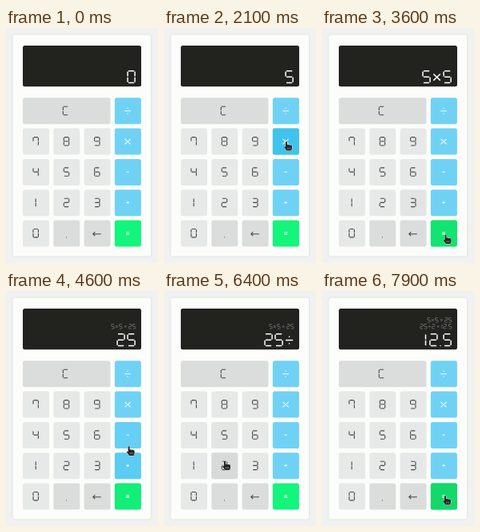
Animation, 190 px wide and 294 px high, one loop 8000 ms. Source, as an HTML page with a canvas:

```html
<!DOCTYPE html>
<html lang="en">
<head>
<meta charset="utf-8">
<title>Calculator</title>
<style>
  html, body { margin: 0; width: 100%; height: 100%; overflow: hidden; background: #f0f2f1; }
  canvas { display: block; width: 190px; height: 294px; }
</style>
</head>
<body>
<canvas role="img" aria-label="Calculator"></canvas>
<script>
const canvas = document.querySelector('canvas');
const ctx = canvas.getContext('2d');
const dpr = window.devicePixelRatio || 1;
canvas.width = 190 * dpr;
canvas.height = 294 * dpr;
ctx.scale(dpr, dpr);

const LOOP = 8000, PITCH = 38.3, SIZE = 33;
const DIGIT = ['#e7e9e8', '#cfd1d0', '#c4c6c5'];
const GRAY = ['#dbdddc', '#cfd1d0', '#c4c6c5'];
const BLUE = ['#6fd2f5', '#40c3ed', '#38bce8'];
const GREEN = ['#13f57b', '#13d86b', '#10cc64'];

const keys = [];
['C  ÷', '789×', '456-', '123+', '0.←='].forEach((row, r) => {
  [...row].forEach((ch, c) => {
    if (ch === ' ') return;
    const colors = ch === '=' ? GREEN : c === 3 ? BLUE : 'C.←'.includes(ch) ? GRAY : DIGIT;
    keys.push({ ch, colors, x: 21 + c * PITCH, y: 87.3 + r * PITCH, w: ch === 'C' ? 109.5 : SIZE });
  });
});

// Fingertip stops: start of move, arrival, x, y
const moves = [
  [600, 700, 153, 258], [800, 1200, 84, 177], [1650, 2050, 153, 142],
  [2350, 2650, 84.5, 177.5], [3350, 3600, 154.5, 258.5], [4400, 4850, 152.5, 106],
  [6000, 6400, 76, 212.5], [7050, 7450, 154, 256]
];
const presses = [[1400, '5'], [2150, '×'], [2950, '5'], [4100, '='], [5250, '÷'], [6600, '2'], [7750, '=']];
const readouts = [[0, '0'], [1400, '5'], [2200, '5×'], [3000, '5×5'], [4150, '25'],
  [5300, '25÷'], [6650, '25÷2'], [7800, '12.5']];
const history = [[4150, '5×5 = 25'], [7800, '25÷2 = 12.5']];

// Lit segments: a top, b/c right, d bottom, e/f left, g middle
const SEGMENTS = { 0: 'abcdef', 2: 'abged', 3: 'abgcd', 4: 'fgbc', 5: 'afgcd',
  6: 'afgedc', 7: 'fabc', 8: 'abcdefg', 9: 'abcdfg', C: 'afed' };
const LINES = {
  a: [.1, 0, .9, 0], b: [1, .05, 1, .46], c: [1, .54, 1, .95], d: [.1, 1, .9, 1],
  e: [0, .54, 0, .95], f: [0, .05, 0, .46], g: [.1, .5, .9, .5]
};
const SIGNS = {
  1: [[.5, .04, .5, .46], [.5, .54, .5, .96]],
  '×': [[.03, .25, .97, .8], [.97, .25, .03, .8]],
  '÷': [[0, .52, 1, .52], [.43, .24, .57, .24], [.43, .8, .57, .8]],
  '-': [[.2, .5, .8, .5]],
  '+': [[.2, .5, .8, .5], [.5, .32, .5, .68]],
  '=': [[.15, .4, .85, .4], [.15, .63, .85, .63]],
  '.': [[.44, 1, .56, 1]]
};

function glyph(ch, x, y, h, w = h * .61) {
  const lines = SIGNS[ch] || [...(SEGMENTS[ch] || '')].map(s => LINES[s]);
  ctx.beginPath();
  for (const [x1, y1, x2, y2] of lines) {
    ctx.moveTo(x + x1 * w, y + y1 * h);
    ctx.lineTo(x + x2 * w, y + y2 * h);
  }
  ctx.stroke();
}

const advance = (ch, h) => h * ({ '.': .28, 1: .46, ' ': .18 }[ch] || .88);

function readout(text, right, y, h, color, weight) {
  ctx.strokeStyle = color;
  ctx.lineWidth = weight;
  let x = right + h * .22;
  for (const ch of [...text].reverse()) {
    const step = advance(ch, h);
    x -= step;
    glyph(ch, x + (step - h * .83) / 2, y, h);
  }
}

function box(x, y, w, h, r, color) {
  ctx.fillStyle = color;
  ctx.beginPath();
  ctx.roundRect(x, y, w, h, r);
  ctx.fill();
}

function cursorAt(t) {
  if (t < moves[0][1]) return null;
  let [, , x, y] = moves[0];
  for (const [start, end, nx, ny] of moves.slice(1)) {
    if (t < start) break;
    const p = Math.min(1, (t - start) / (end - start));
    const e = p * p * (3 - 2 * p);
    x += (nx - x) * e;
    y += (ny - y) * e;
  }
  return { x, y };
}

function isOver(key, t) {
  const p = cursorAt(t);
  return p && p.x >= key.x && p.x <= key.x + key.w && p.y >= key.y && p.y <= key.y + SIZE;
}

function hover(key, t) {
  let sum = 0;
  for (let lag = 0; lag < 150; lag += 30) sum += isOver(key, t - lag) ? 1 : 0;
  return sum / 5;
}

function drawKey(key, t) {
  const { ch, colors, x, y, w } = key;
  box(x, y, w, SIZE, 2.5, colors[0]);
  ctx.globalAlpha = hover(key, t);
  const pressed = presses.some(([at, k]) => k === ch && t >= at && t < at + 150);
  box(x, y, w, SIZE, 2.5, colors[pressed ? 2 : 1]);
  ctx.globalAlpha = 1;

  const cx = x + (ch === 'C' ? 53.5 : 16.2), cy = y + 16.2;
  const sign = '÷×-+='.includes(ch);
  ctx.strokeStyle = sign ? '#f4fcff' : '#454645';
  ctx.lineWidth = 1.1;
  if (ch === '←') {
    ctx.beginPath();
    ctx.moveTo(cx + 5, cy + 1);
    ctx.lineTo(cx - 5, cy + 1);
    ctx.moveTo(cx - 2.5, cy - 1.5);
    ctx.lineTo(cx - 5, cy + 1);
    ctx.lineTo(cx - 2.5, cy + 3.5);
    ctx.stroke();
  } else if (sign) {
    const h = '÷×'.includes(ch) ? 12 : 9;
    glyph(ch, cx - h * .32, cy - h * .5, h, h * .64);
  } else {
    glyph(ch, cx - 3.2, cy - 5.2, 10.4, 6.4);
  }
}

const hand = new Path2D('M-1 .6Q0-.7 1 .6V4.2Q2.2 3.4 3.2 4.4Q4.4 3.7 5.3 4.8Q7 4.5 7 6.2V8.4L6 11.5H.4L-2.6 7.4Q-3 5.9-1 6.5Z');

function drawCursor(t) {
  const p = cursorAt(t);
  if (!p) return;
  ctx.save();
  ctx.translate(p.x, p.y);
  ctx.lineWidth = 1;
  ctx.strokeStyle = '#eceeed';
  ctx.stroke(hand);
  ctx.fillStyle = '#252525';
  ctx.fill(hand);
  ctx.strokeStyle = '#b8b8b8';
  ctx.lineWidth = .5;
  ctx.beginPath();
  for (const x of [1.4, 3, 4.6]) {
    ctx.moveTo(x, 7.5);
    ctx.lineTo(x, 9.8);
  }
  ctx.stroke();
  ctx.restore();
}

function draw(t) {
  ctx.fillStyle = '#f0f2f1';
  ctx.fillRect(0, 0, 190, 294);
  ctx.shadowColor = 'rgba(0,0,0,.12)';
  ctx.shadowBlur = 3 * dpr;
  box(8.5, 8.5, 172.5, 277, 3, '#fcfdfb');
  ctx.shadowColor = 'transparent';
  box(21, 22, 148, 51.3, 2.5, '#22221f');

  const past = history.filter(([at]) => t >= at);
  past.forEach(([, text], i) =>
    readout(text, 162, 41.5 - 8 * (past.length - 1 - i), 5.6, '#858583', .7));
  const current = readouts.filter(([at]) => t >= at).pop()[1];
  readout(current, 161.5, 53.8, 14.8, '#fff', 1.5);

  keys.forEach(key => drawKey(key, t));
  drawCursor(t);
}

const began = performance.now();
function tick() {
  draw((performance.now() - began) % LOOP);
  requestAnimationFrame(tick);
}
tick();
</script>
</body>
</html>
```
